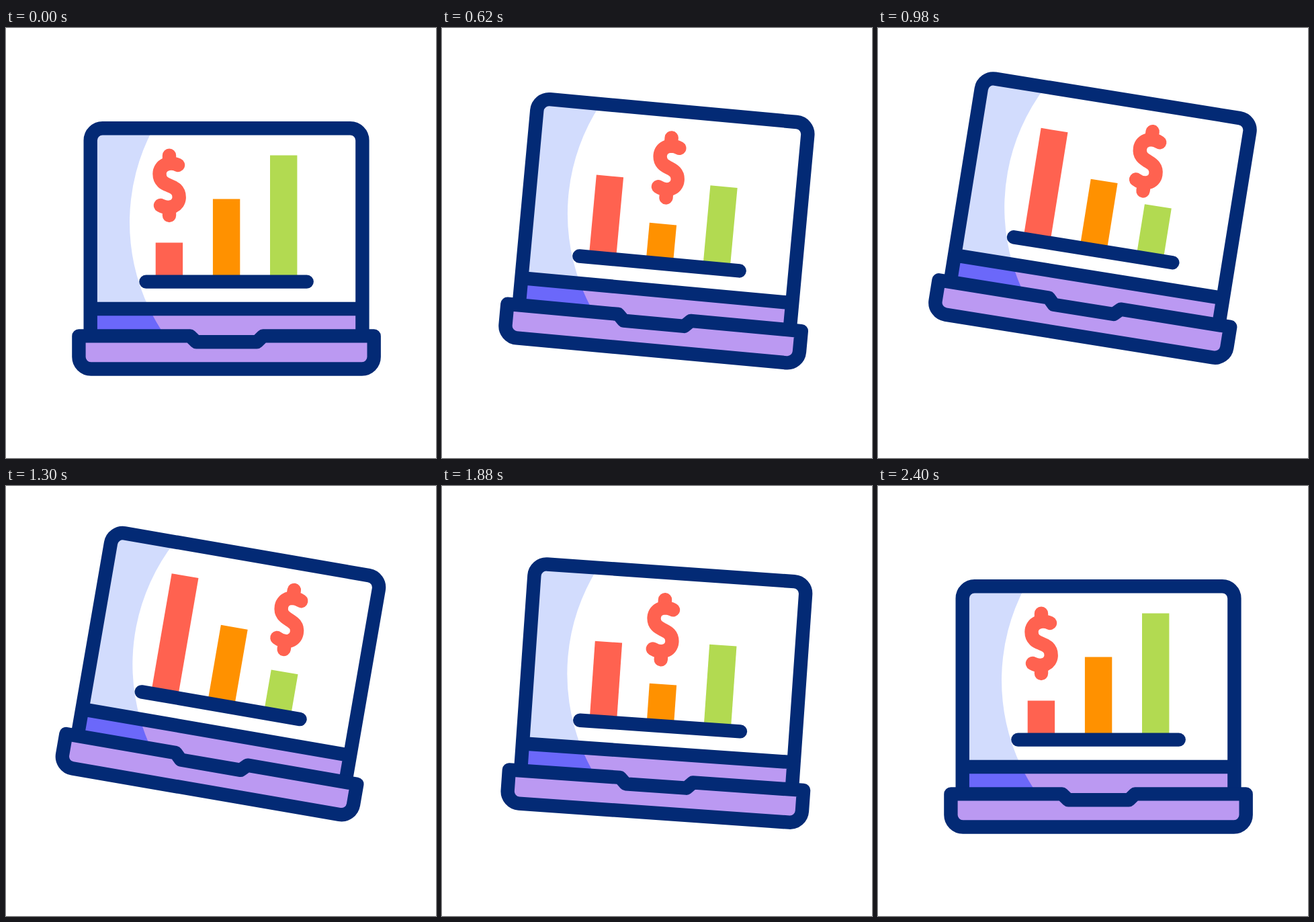
Animation, 640 px wide and 640 px high, one loop 2.42 s. Source, as an HTML page:

```html
<!DOCTYPE html>
<html lang="en">
<head>
<meta charset="utf-8">
<title>Laptop chart</title>
<style>
  html, body { margin: 0; width: 100%; height: 100%; overflow: hidden; background: #fff; }
  svg { display: block; width: 100%; height: 100%; }
  .line { fill: none; stroke: #032a75; stroke-width: 20.4; stroke-linecap: round; stroke-linejoin: round; }
  .dollar { fill: none; stroke: #ff6250; stroke-width: 20.4; stroke-linecap: round; stroke-linejoin: round; }
</style>
</head>
<body>
<svg viewBox="0 0 640 640">
  <g id="laptop">
    <path fill="#d2dcfd" d="M126 150H218.9A296 296 0 0 0 213.4 418H126z"/>
    <path fill="#bb99f2" d="M126 418H530V458H126z"/>
    <path fill="#6b68fa" d="M126 418H213.4A296 296 0 0 0 236.7 458H126z"/>
    <rect id="red" x="222.7" width="40.4" fill="#ff6250"/>
    <rect id="orange" x="307.9" width="40.4" fill="#ff9100"/>
    <rect id="green" x="393" width="40.4" fill="#b2da51"/>
    <path class="line" d="M208.4 377.6H447.7"/>
    <path class="line" d="M125.7 458V167.3a18 18 0 0 1 18-18H512.4a18 18 0 0 1 18 18V458M125.7 418H530.4"/>
    <path class="line" style="fill:#bb99f2" d="M108.4 458.4H274L283 467.3H373.5L382.5 458.4H547.7V489.5a18 18 0 0 1-18 18H126.4a18 18 0 0 1-18-18z"/>
    <path id="dollar" class="dollar" d="M243 189.7V202M243 267V279.1M256 204C243 198 228.5 204 228.5 217C228.5 229 237 232 243 234.5C249 237 257.7 240 257.7 252C257.7 265 243 271 230 264"/>
  </g>
</svg>
<script>
const LOOP = 2420, MOTION = 2400, AXIS = 367.5;
const [laptop, dollar] = ["laptop", "dollar"].map(id => document.getElementById(id));

// Bar heights at evenly spaced keys
const bars = {
  red: [48, 112.4, 176, 112.4, 48],
  orange: [113, 48.8, 113, 48.8, 113],
  green: [178, 112.8, 50.5, 112.8, 178]
};

// Eased value at progress p (0..1) through evenly spaced keys
function keyed(keys, p) {
  const pos = p * (keys.length - 1);
  const i = Math.min(Math.floor(pos), keys.length - 2);
  const u = pos - i;
  return keys[i] + (keys[i + 1] - keys[i]) * u * u * (3 - 2 * u);
}

function draw(now) {
  const p = Math.min(now % LOOP, MOTION) / MOTION;
  const tilt = keyed([0, 1, 0], p);
  laptop.setAttribute("transform", `translate(0 ${-51.2 * tilt}) rotate(${10 * tilt} 328 328)`);
  dollar.setAttribute("transform", `translate(${keyed([0, 85.7, 170, 83.5, 0], p)} 0)`);
  for (const id in bars) {
    const height = keyed(bars[id], p), bar = document.getElementById(id);
    bar.setAttribute("y", AXIS - height);
    bar.setAttribute("height", height + 8);
  }
}

const start = performance.now();
function tick() {
  draw(performance.now() - start);
  requestAnimationFrame(tick);
}
tick();
</script>
</body>
</html>
```
